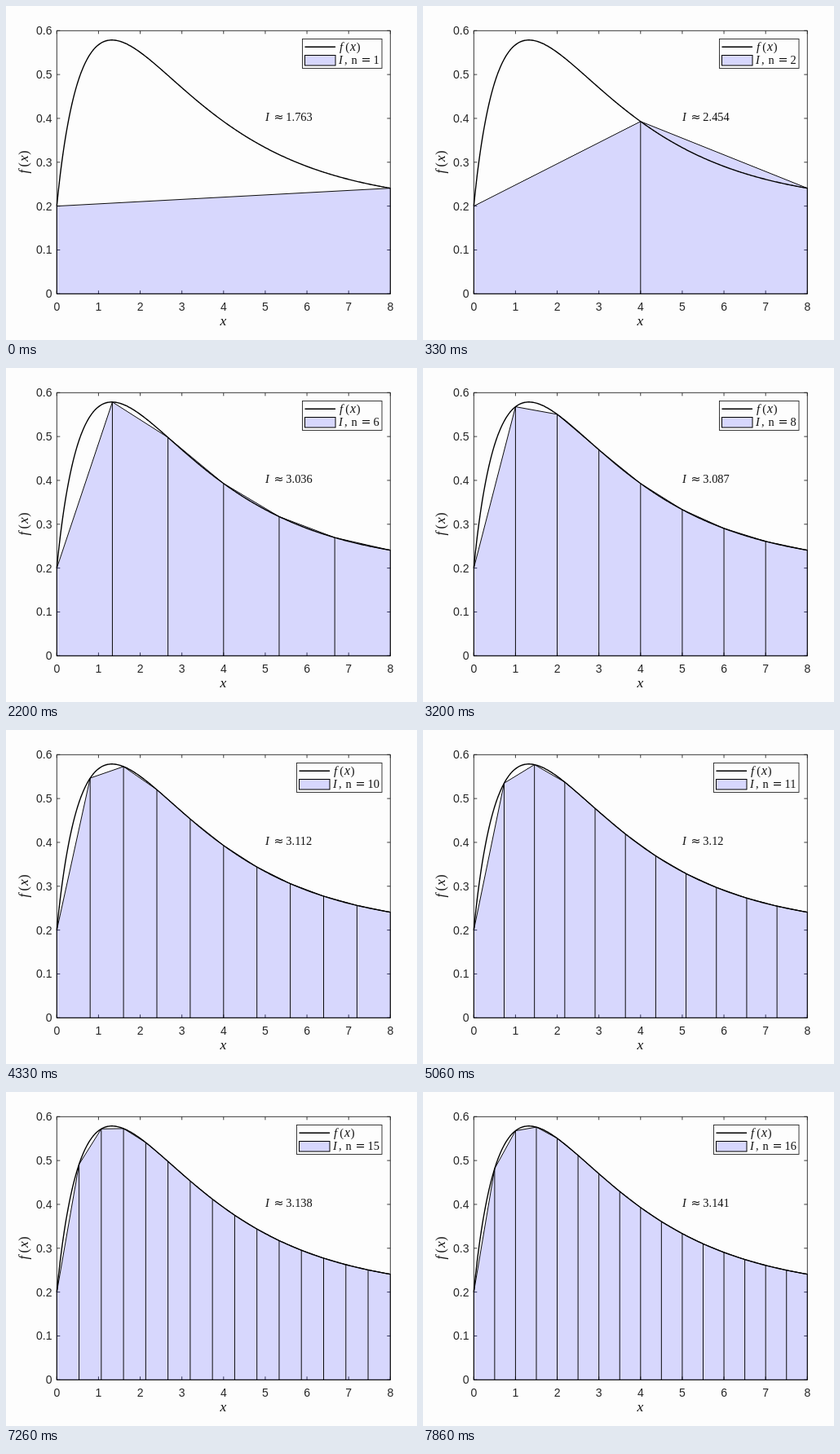
Recreate the animation shown at these times as an HTML page with a canvas. Size 504x410 px, loop 8 s.

```html
<!DOCTYPE html>
<html lang="en">
<head>
<meta charset="utf-8">
<title>Trapezoidal rule</title>
<style>
  html, body { margin: 0; width: 100%; height: 100%; overflow: hidden; background: #fdfdfd; }
  canvas { display: block; width: 504px; height: 410px; }
</style>
</head>
<body>
<canvas id="stage"></canvas>
<script>
const W = 504, H = 410, LOOP = 8000;
const L = 62.3, R = 471.3, T = 30.3, B = 353.3;
const X_MAX = 8, Y_MAX = 0.6;
const INK = '#262626', FILL = 'rgba(0,0,255,0.15)';
const SANS = '"Liberation Sans", Arial, sans-serif';
const SERIF = '"Liberation Serif", "Times New Roman", serif';
const SYMBOL = '"DejaVu Sans", sans-serif';

// Each step adds one more trapezoid.
const steps = [330, 800, 1260, 1730, 2200, 2660, 3200, 3730,
               4330, 5060, 5600, 6130, 6730, 7260, 7860];

const canvas = document.getElementById('stage');
const ratio = window.devicePixelRatio || 1;
canvas.width = W * ratio;
canvas.height = H * ratio;
const ctx = canvas.getContext('2d');

const f = x => 0.2 + x * Math.exp(-Math.pow(x, 0.8));
const px = x => L + (R - L) * x / X_MAX;
const py = y => B - (B - T) * y / Y_MAX;

function line(points, width, color = '#000') {
  ctx.beginPath();
  points.forEach(([x, y]) => ctx.lineTo(x, y));
  ctx.lineWidth = width;
  ctx.strokeStyle = color;
  ctx.stroke();
}

function text(str, x, y, font, align = 'left', color = '#111') {
  ctx.font = font;
  ctx.textAlign = align;
  ctx.fillStyle = color;
  ctx.fillText(str, x, y);
}

const roman = (str, x, y, size) => text(str, x, y, `${size}px ${SERIF}`);
const italic = (str, x, y, size) => text(str, x, y, `italic ${size}px ${SERIF}`);
const symbol = (str, x, y, size) => text(str, x, y, `${size}px ${SYMBOL}`, 'center');

function fOfX(x, y, em) {
  italic('f', x + 0.1 * em, y, em * 1.05);
  roman('(', x + 0.6 * em, y, em);
  italic('x', x + 1.01 * em, y, em * 1.1);
  roman(')', x + 1.54 * em, y, em);
}

function integral(n) {
  const h = X_MAX / n;
  let sum = (f(0) + f(X_MAX)) / 2;
  for (let i = 1; i < n; i++) sum += f(i * h);
  return sum * h;
}

function drawAxes() {
  for (let x = 0; x <= X_MAX; x++) {
    const p = px(x);
    line([[p, B], [p, B - 4]], 0.9, INK);
    line([[p, T], [p, T + 4]], 0.9, INK);
    text(x, p, 373.5, `14px ${SANS}`, 'center', INK);
  }
  for (let i = 0; i <= 6; i++) {
    const p = py(i / 10);
    line([[L, p], [L + 4, p]], 0.9, INK);
    line([[R, p], [R - 4, p]], 0.9, INK);
    text(i / 10, 56.5, p + 5, `14px ${SANS}`, 'right', INK);
  }
  ctx.lineWidth = 0.9;
  ctx.strokeStyle = INK;
  ctx.strokeRect(L, T, R - L, B - T);

  italic('x', 262.5, 391.5, 17.5);
  ctx.save();
  ctx.translate(27, 207);
  ctx.rotate(-Math.PI / 2);
  fOfX(0, 0, 15.8);
  ctx.restore();
}

function drawTrapezoids(n) {
  const h = X_MAX / n;
  for (let i = 0; i < n; i++) {
    const a = i * h, b = a + h;
    const shape = [[px(a), B], [px(a), py(f(a))], [px(b), py(f(b))], [px(b), B]];
    ctx.beginPath();
    shape.forEach(([x, y]) => ctx.lineTo(x, y));
    ctx.closePath();
    ctx.fillStyle = FILL;
    ctx.fill();
  }
  for (let i = 0; i <= n; i++) {
    const x = px(i * h);
    line([[x, B], [x, py(f(i * h))]], 0.95);
  }
  line(Array.from({ length: n + 1 }, (_, i) => [px(i * h), py(f(i * h))]), 0.95);
  line([[L, B], [R, B]], 0.9);
}

function drawCurve() {
  const count = 400;
  line(Array.from({ length: count + 1 }, (_, i) => {
    const x = X_MAX * i / count;
    return [px(x), py(f(x))];
  }), 1.4);
}

function drawLegend(n) {
  const em = 14.4, wide = n > 9;
  const left = wide ? 356.5 : 363.5, tx = wide ? 401 : 408;
  ctx.fillStyle = '#fdfdfd';
  ctx.fillRect(left, 40.5, 461 - left, 36);
  ctx.lineWidth = 0.9;
  ctx.strokeStyle = INK;
  ctx.strokeRect(left, 40.5, 461 - left, 36);

  line([[left + 3, 50.3], [left + 40.5, 50.3]], 1.4);
  ctx.fillStyle = FILL;
  ctx.fillRect(left + 3, 60.5, 37.5, 12.5);
  ctx.lineWidth = 1;
  ctx.strokeStyle = '#000';
  ctx.strokeRect(left + 3, 60.5, 37.5, 12.5);

  fOfX(tx - 0.5, 54.5, em);
  italic('I', tx, 70.5, em);
  roman(',', tx + 0.48 * em, 70.5, em);
  roman('n', tx + 1.07 * em, 70.5, em);
  symbol('=', tx + 2.32 * em, 70.5, em);
  roman(n, tx + 2.96 * em, 70.5, em);
}

function drawValue(n) {
  const em = 14.4, x = 318, y = 141;
  italic('I', x, y, em);
  symbol('≈', x + 1.15 * em, y, em);
  roman(Number(integral(n).toPrecision(4)), x + 1.76 * em, y, em);
}

function frame(now) {
  const t = now % LOOP;
  const n = 1 + steps.filter(s => t >= s).length;
  ctx.setTransform(ratio, 0, 0, ratio, 0, 0);
  ctx.fillStyle = '#fdfdfd';
  ctx.fillRect(0, 0, W, H);
  drawAxes();
  drawTrapezoids(n);
  drawCurve();
  drawLegend(n);
  drawValue(n);
}

const start = performance.now();
function tick() {
  frame(performance.now() - start);
  requestAnimationFrame(tick);
}
tick();
</script>
</body>
</html>
```
